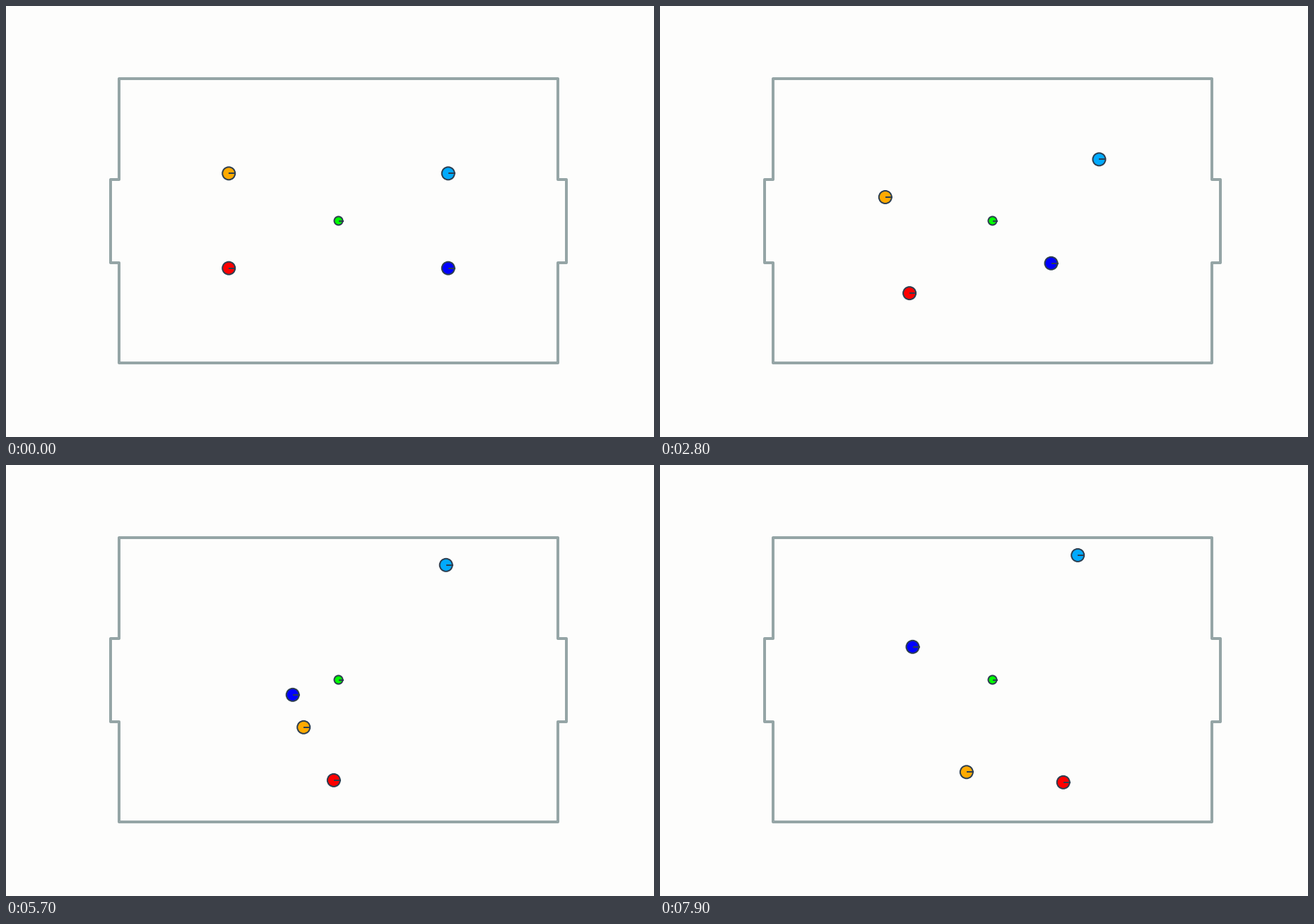
These frames come from a looping animation (917x611 px, 8000 ms). A matplotlib script:

```python
import numpy as np
import matplotlib.pyplot as plt
from matplotlib.animation import FuncAnimation
from matplotlib.patches import Circle

W, H, DPI = 917, 611, 64
STEP, FRAMES = 100, 80
PX = 72 / DPI  # points per pixel

BG, WALL, INK, HIT = "#fdfdfc", "#95a5a6", "#2c3e50", "#e74c3c"

# field geometry, measured from its centre
CX, CY = 470.5, 304.5
HALF_W, HALF_H = 310.5, 201.5
GOAL_H, GOAL_DEPTH = 59, 11.7
R = 9
STOP = HALF_H - R - 5.5  # a robot's centre cannot pass this line

# colour, starting quadrant and the points passed at KEYS (seconds)
KEYS = [0, 1.9, 3.6, 4.5, 5.7, 6.6, 7.9]
ROBOTS = [
    ("#ffaa00", (-1, -1), [(-161.5, -56), (-133, -8.5), (-97, 20.3),
                           (-49.3, 67.3), (-40.5, 105.8), (-36.7, 130.8)]),
    ("#ff0000", (-1, 1), [(-136.7, 90), (-93.3, 114.2), (-56.8, 126.8),
                          (-6.7, 142.4), (32.5, 144.4), (100.2, 145.3)]),
    ("#00aaff", (1, -1), [(155.2, -77.2), (149, -101.6), (153.8, -127.8),
                          (152.2, -162.7), (147.3, -192), (120.7, -176.6)]),
    ("#0000ff", (1, 1), [(117.8, 69.1), (44.2, 51.6), (-7, 46.4),
                         (-64.8, 21.3), (-95.5, -5.2), (-113, -46.7)]),
]


def glide(points):
    """Smooth curve through the points, starting from rest."""
    t, p = np.array(KEYS), np.array(points, float)
    vel = np.gradient(p, t, axis=0)
    vel[0] = 0

    def at(now):
        i = min(np.searchsorted(t, now, "right") - 1, len(t) - 2)
        d = t[i + 1] - t[i]
        u = (now - t[i]) / d
        return (p[i] + (p[i + 1] - p[i]) * u * u * (3 - 2 * u)
                + d * u * (1 - u) * ((1 - u) * vel[i] - u * vel[i + 1]))

    return at


class Ball:
    def __init__(self, r, color):
        self.r = r
        self.disc = ax.add_patch(Circle((0, 0), r, fc=color, ec=INK,
                                        lw=2 * PX, zorder=3))
        self.hand, = ax.plot([], [], color=INK, lw=2 * PX, zorder=4,
                             solid_capstyle="butt")

    def move(self, x, y):
        self.disc.center = x, y
        self.hand.set_data([x, x + self.r + 1], [y, y])


fig = plt.figure(figsize=(W / DPI, H / DPI), dpi=DPI, facecolor=BG)
ax = fig.add_axes([0, 0, 1, 1])
ax.set_xlim(-CX, W - CX)
ax.set_ylim(H - CY, -CY)
ax.axis("off")

# one quarter of the outline, mirrored into the other three
quarter = np.array([(HALF_W, HALF_H), (HALF_W, GOAL_H),
                    (HALF_W + GOAL_DEPTH, GOAL_H)])
outline = np.vstack([quarter, quarter[::-1] * (1, -1),
                     quarter * (-1, -1), quarter[::-1] * (-1, 1)])
ax.add_patch(plt.Polygon(outline, fill=False, ec=WALL, lw=4 * PX,
                         joinstyle="round"))

Ball(R * 2 / 3, "#00ff00").move(0, 0)
robots = []
for color, side, points in ROBOTS:
    start = np.multiply(side, (HALF_W / 2, HALF_H / 3))
    robots.append((Ball(R, color), glide([start, *points])))
touch, = ax.plot([], [], color=HIT, lw=2 * PX, zorder=5, solid_capstyle="butt")


def update(frame):
    touch.set_data([], [])
    for ball, at in robots:
        x, y = at(frame * STEP / 1000)
        if y < -STOP:
            y = -STOP
            touch.set_data([x, x], [y - 20, y + 4])
        ball.move(x, y)
    return []


anim = FuncAnimation(fig, update, frames=FRAMES, interval=STEP,
                     init_func=lambda: update(0), repeat=True, repeat_delay=0)
plt.show()
```
